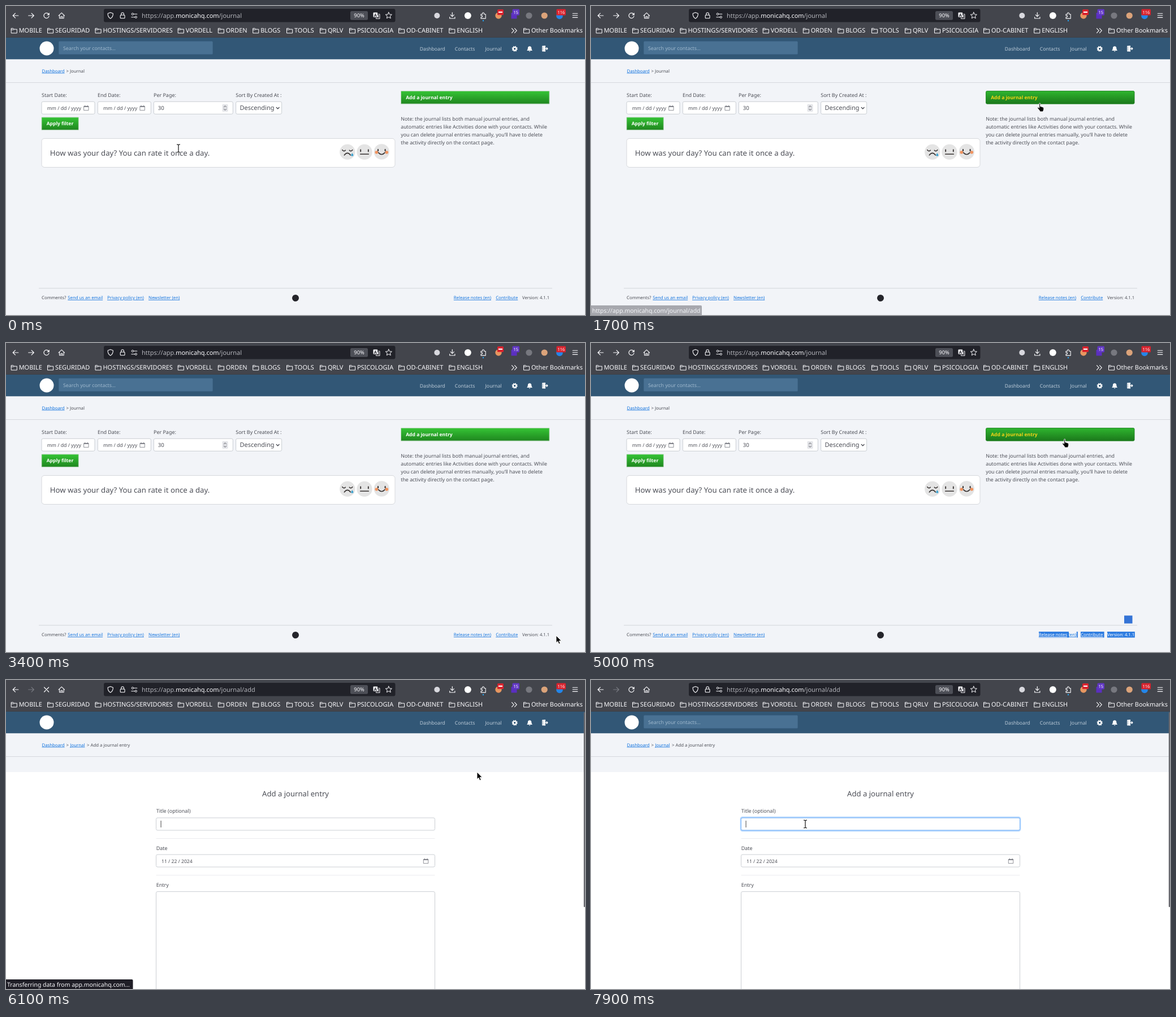
Write an HTML page that moves like this. It is 1024 by 547 pixels and loops after 8 s.

```html
<!DOCTYPE html>
<html lang="en">
<head>
<meta charset="utf-8">
<title>Journal</title>
<style>
  html, body { margin: 0; width: 100%; height: 100%; overflow: hidden; background: #f2f4f8; }
  svg { display: block; width: 100vw; height: 100vh; }
  text { font-family: 'Noto Sans', 'Open Sans', sans-serif; white-space: pre; text-rendering: geometricPrecision; }
</style>
</head>
<body>
<svg id="stage" viewBox="0 0 1024 547" preserveAspectRatio="none"></svg>
<script>
const NS = 'http://www.w3.org/2000/svg';
const stage = document.getElementById('stage');
let layer = stage;

function add(tag, attrs = {}, content) {
  const e = document.createElementNS(NS, tag);
  for (const k in attrs) e.setAttribute(k, attrs[k]);
  if (content) e.textContent = content;
  layer.appendChild(e);
  return e;
}
function group(draw, attrs, tag = 'g') {
  const outer = layer, g = add(tag, attrs);
  layer = g;
  draw();
  layer = outer;
  return g;
}
const rect = (x, y, width, height, fill, more) => add('rect', { x, y, width, height, fill, ...more });
const circle = (cx, cy, r, fill, more) => add('circle', { cx, cy, r, fill, ...more });
const path = (d, fill, more) => add('path', { d, fill, ...more });
const line = (d, stroke, width = 1.1, more) => path(d, 'none',
  { stroke, 'stroke-width': width, 'stroke-linecap': 'round', 'stroke-linejoin': 'round', ...more });
const text = (x, y, str, size, fill, more) => add('text', { x, y, 'font-size': size, fill, ...more }, str);
const link = (x, y, str, size) => text(x, y, str, size, '#1273de', { 'text-decoration': 'underline' });
const show = (g, on) => g.setAttribute('visibility', on ? 'visible' : 'hidden');
const field = (x, y, w, h) => rect(x, y, w, h, '#fff', { rx: 2.5, stroke: '#c6cad0', 'stroke-width': .9 });

function gradient(id, top, bottom) {
  group(() => {
    add('stop', { offset: 0, 'stop-color': top });
    add('stop', { offset: 1, 'stop-color': bottom });
  }, { id, x1: 0, y1: 0, x2: 0, y2: 1 }, 'linearGradient');
}
gradient('green', '#35c435', '#1f861f');
gradient('greenHover', '#2fb52f', '#1b781b');

const INK = '#4d4f57', PALE = '#f2f4f8', LIGHT = '#fbfbfe', BAR = '#43454c', WELL = '#212229';

function button(x, y, w, h, label, hover) {
  rect(x, y, w, h, `url(#${hover ? 'greenHover' : 'green'})`,
    { rx: hover ? 2 : .5, stroke: hover ? '#1d8220' : '#b9d9bb', 'stroke-width': .9 });
  text(x + 8.7, y + h / 2 + 3.2, label, 8.55, hover ? '#f5d417' : '#fff', { 'font-weight': 700 });
}
function calendar(x, y) {
  line(`M${x - 4} ${y - 3}h8v7.2h-8z`, '#74767e', .8);
  rect(x - 4, y - 3.4, 8, 1.7, '#74767e');
  line(`M${x - 2.3} ${y - 4.5}v1M${x + 2.3} ${y - 4.5}v1`, '#74767e', .8);
}

// ---- journal list ----
function face(x, y, draw) {
  circle(x, y, 13.7, '#e4e4e4');
  group(draw, { transform: `translate(${x} ${y})` });
}
const listPage = group(() => {
  rect(0, 94, 1024, 453, PALE);
  link(63.5, 117.6, 'Dashboard', 7.75);
  text(106.5, 117.6, '> Journal', 7.75, INK);
  rect(0, 135, 1024, 1, '#d5d8de');

  [[63, 'Start Date:'], [162, 'End Date:'], [261, 'Per Page:'], [406.3, 'Sort By Created At :']]
    .forEach(([x, s]) => text(x, 160.5, s, 8.95, INK));
  [63, 162.3].forEach(x => {
    field(x, 169.3, 94, 22);
    text(x + 9.7, 184, 'mm / dd / yyyy', 8.7, INK);
    calendar(x + 79, 180.5);
  });
  field(261.3, 169.3, 140, 22);
  text(268.8, 184, '30', 9.6, INK);
  rect(382.5, 174, 10, 13, '#e3e4e8', { rx: 1 });
  line('M385.3 179l2.2-2.2 2.2 2.2M385.3 182.2l2.2 2.2 2.2-2.2', '#55565e', 1);
  field(406.6, 169.3, 81, 22);
  text(413.5, 184.3, 'Descending', 11, INK);
  line('M478.3 179.5l2.4 2.5 2.4-2.5', '#44464e', 1.2);
  button(63, 197, 65.3, 22.4, 'Apply filter');

  rect(63, 234.5, 625, 51, '#fff', { rx: 5, stroke: '#d6d8dc', 'stroke-width': 1 });
  text(77.8, 264.7, 'How was your day? You can rate it once a day.', 13.17, INK);
  const dark = '#35302f';
  face(603.8, 258.4, () => {
    line('M-9-3.6q2.5 3.6 5.4.6M9-3.6q-2.5 3.6-5.4.6', dark, 1.5);
    line('M-5.5 5.5q5.5-7 11 0', dark, 1.6);
    path('M8.5 1.8q4.2 5.6 0 5.6t0-5.6', '#3fa3cf');
  });
  face(634, 258.4, () => {
    line('M-6.8-4v3.2M6.8-4v3.2', dark, 1.8);
    line('M-7.3 3.8h14.6', dark, 1.6);
  });
  face(664.3, 258, () => {
    circle(-9, 1, 2.8, '#f0935f');
    circle(9, 1, 2.8, '#f0935f');
    line('M-6.3-4v2.6M6.3-4v2.6', dark, 2);
    line('M-5.6 1.6q5.6 6.4 11.2 0', dark, 1.6);
  });

  ['Note: the journal lists both manual journal entries, and',
   'automatic entries like Activities done with your contacts. While',
   'you can delete journal entries manually, you’ll have to delete',
   'the activity directly on the contact page.']
    .forEach((s, i) => text(698.2, 203 + i * 14.15, s, 8.86, INK));

  rect(58, 499.2, 908, 1, '#d3d6db');
  text(63, 519.2, 'Comments?', 7.8, INK);
  link(109.3, 519.2, 'Send us an email', 7.75);
  link(179, 519.2, 'Privacy policy (en)', 7.75);
  link(252, 519.2, 'Newsletter (en)', 7.75);
  circle(512, 517, 6, '#24242a');
  link(791.8, 519.2, 'Release notes (en)', 7.75);
  link(866.2, 519.2, 'Contribute', 7.75);
  text(913, 519.2, 'Version: 4.1.1', 7.65, INK);
});

const addButton = [false, true].map(h => group(() => button(698.5, 150.6, 262.5, 22.6, 'Add a journal entry', h)));

let selEdge;
group(() => { selEdge = rect(792, 505, 190, 25, '#000'); }, { id: 'sel' }, 'clipPath');
const selection = group(() => {
  [[792, 53], [858.8, 2], [866, 41.6], [913, 48.8]].forEach(([x, w]) => rect(x, 511, w, 10.5, '#2f7de1'));
  text(791.8, 519.2, 'Release notes', 7.75, '#fff', { 'text-decoration': 'underline' });
  text(866.2, 519.2, 'Contribute', 7.75, '#fff', { 'text-decoration': 'underline' });
  text(913, 519.2, 'Version: 4.1.1', 7.65, '#fff');
}, { 'clip-path': 'url(#sel)' });
const popup = group(() => rect(943, 482.5, 14.5, 14, '#3473d6'));

// ---- entry form ----
let ring;
const formPage = group(() => {
  rect(0, 94, 1024, 69, PALE);
  rect(0, 163, 1024, 384, '#fff');
  link(63.5, 117.6, 'Dashboard', 7.75);
  text(106.5, 117.6, '>', 7.75, INK);
  link(113.5, 117.6, 'Journal', 7.75);
  text(143, 117.6, '> Add a journal entry', 7.75, INK);
  rect(0, 135, 1024, 1, '#d5d8de');
  text(512, 206.2, 'Add a journal entry', 13.1, INK, { 'text-anchor': 'middle' });
  text(265.7, 235.3, 'Title (optional)', 9, INK);
  field(265.5, 244, 493, 22);
  ring = group(() => {
    rect(264.8, 243, 494.4, 24, 'none', { rx: 3, stroke: '#b5d7ff', 'stroke-width': 2.4 });
    rect(265.5, 244, 493, 22, 'none', { rx: 2.5, stroke: '#7db8fb', 'stroke-width': 1 });
  });
  rect(273.6, 249, .9, 12, '#333');
  rect(265.5, 280, 493, 1, '#ececef');
  text(265.7, 301, 'Date', 9, INK);
  field(265.5, 309, 493, 22);
  text(275, 324, '11 / 22 / 2024', 8.6, INK, { 'font-variant-numeric': 'proportional-nums' });
  calendar(742.7, 320.5);
  rect(265.5, 345, 493, 1, '#ececef');
  text(265.7, 366, 'Entry', 9, INK);
  field(265.5, 374.6, 493, 190);
});

// ---- site header ----
rect(0, 56, 1024, 38.3, '#325776');
circle(72, 75, 12.5, '#fff');
const search = group(() => {
  rect(93.3, 62.6, 272.3, 22.8, '#497193', { rx: 1.5 });
  text(101, 77.5, 'Search your contacts…', 8.8, '#9fb9ce');
});
[[731.7, 'Dashboard'], [793.8, 'Contacts'], [847.5, 'Journal']]
  .forEach(([x, s]) => text(x, 79, s, 8.7, '#bccbd8'));
circle(899.7, 75.8, 2.8, 'none', { stroke: '#fff', 'stroke-width': 2.2 });
circle(899.7, 75.8, 4.3, 'none', { stroke: '#fff', 'stroke-width': 1.5, 'stroke-dasharray': '1.8 1.58' });
path('M921.2 79q1.7-1.4 1.7-4.2 0-3.4 3.2-3.6 3.2.2 3.2 3.6 0 2.8 1.7 4.2zM924.6 79.8h3q-1.5 2.2-3 0z', '#fff');
line('M952 71.2h-3.2v8.6h3.2', '#fff', 1.4);
path('M950 71l4-1v11l-4-1.2z', '#fff');
line('M954.5 75.5h3.2m-1.6-1.8l1.8 1.8-1.8 1.8', '#fff', 1.3);
const scrollbar = group(() => rect(1021.8, 57, 2.2, 345, '#66676c', { rx: 1 }));

// ---- browser toolbar ----
rect(0, 0, 1024, 55.4, BAR);
rect(0, 55.2, 1024, .8, '#24252b');
rect(173, 5, 515.5, 23.5, WELL, { rx: 3 });
line('M21.8 17h-9.4m4-4.2l-4.2 4.2 4.2 4.2', LIGHT, 1.2);
const forward = line('M39.7 17h9.4m-4-4.2l4.2 4.2-4.2 4.2', LIGHT, 1.2);
const reload = group(() => {
  line('M75.2 14.2a4.6 4.6 0 1 0 .8 4', LIGHT, 1.2);
  path('M76.8 11.8v4.4h-4.4z', LIGHT);
});
const stop = group(() => line('M67.6 13l8 8m0-8l-8 8', LIGHT, 1.2));
line('M93 17.2l5.3-5 5.3 5M94.5 16.5v5.2h7.6v-5.2M97 21.5v-3h2.6v3', LIGHT, 1.1);
line('M184.7 11.6l4.6 1.6q.3 6.2-4.6 9-4.9-2.8-4.6-9z', LIGHT, 1.1);
rect(202.2, 16, 7.8, 5.8, 'none', { rx: 1, stroke: LIGHT, 'stroke-width': 1.1 });
line('M203.8 16v-1.7a2.3 2.5 0 0 1 4.6 0v1.7', LIGHT);
line('M225.6 14.3h6.2M221.8 19.7h6.2', LIGHT);
[[223.8, 14.3], [229.8, 19.7]].forEach(p => circle(...p, 1.7, 'none', { stroke: LIGHT, 'stroke-width': 1 }));
let urlPath;
group(() => {
  add('tspan', {}, 'https://app.');
  add('tspan', { fill: LIGHT }, 'monicahq.com');
  urlPath = add('tspan');
}, { x: 240, y: 20.8, 'font-size': 10.95, fill: '#b3b4ba' }, 'text');
rect(609, 9, 31, 15.8, '#4d4f57', { rx: 2.5 });
text(624.5, 20.3, '90%', 9.3, LIGHT, { 'text-anchor': 'middle' });
rect(649.5, 11.5, 7.6, 8.2, LIGHT, { rx: 1 });
text(650.8, 18.5, 'A', 7.5, WELL, { 'font-weight': 700 });
line('M658.5 14.5h2.5v8h-6.5v-1.5M656.5 17.5h3.2m-1.6-1v1q-.3 2-1.8 3m.6-2.4q.8 1.6 2.6 2.4', LIGHT, .9);
{
  let d = '';
  for (let i = 0; i < 10; i++) {
    const r = i % 2 ? 2.7 : 5.9, a = Math.PI * (i / 5 - .5);
    d += (i ? 'L' : 'M') + (676.8 + r * Math.cos(a)) + ' ' + (17 + r * Math.sin(a));
  }
  line(d + 'z', LIGHT, 1);
}

// extensions
circle(762.3, 17, 5, '#d8d8de');
line('M789.3 11.5v7m-3-2.8l3 3 3-3M784.7 19.5v2.5h9.2v-2.5', LIGHT, 1.2);
circle(816.8, 17, 6, '#fff');
line('M840 14.5h2.5v-1.2a1.5 1.5 0 0 1 3 0v1.2h2.7v7.6h-8.2v-2.4h1.2a1.4 1.4 0 0 0 0-2.8h-1.2z', LIGHT, 1.1);
circle(844, 26, 1.2, '#2aa8f5');
circle(871, 17, 5.7, '#e79660');
rect(869, 6, 11, 10, '#d9232e', { rx: 1.5 });
rect(871, 9.8, 7, 2.2, '#fff');
rect(893.5, 12, 10, 10.5, '#5b2fc0');
rect(895.5, 5.5, 12.5, 11, '#6137c4', { rx: 1.5 });
text(901.8, 14, '15', 7.4, '#fff', { 'text-anchor': 'middle' });
circle(925, 17, 5.6, '#77787f');
circle(952.2, 17, 5.6, '#dba37a');
circle(979, 17.5, 5.8, '#2585e8');
rect(973.5, 5.5, 16.5, 11, '#d9232e', { rx: 1.5 });
text(981.8, 14, '116', 7.4, '#fff', { 'text-anchor': 'middle' });
line('M1002.2 13.2h8.6m-8.6 3.6h8.6m-8.6 3.6h8.6', LIGHT, 1.1);

// bookmarks
[[8.5, 'MOBILE'], [72.8, 'SEGURIDAD'], [157.3, 'HOSTINGS/SERVIDORES'], [303.5, 'VORDELL'], [374.6, 'ORDEN'],
 [436, 'BLOGS'], [495.8, 'TOOLS'], [554.8, 'QRLV'], [606.8, 'PSICOLOGIA'], [693.8, 'OD-CABINET'],
 [783, 'ENGLISH'], [914.8, 'Other Bookmarks']].forEach(([x, s]) => {
  line(`M${x + .7} 47.6v-8h3.6l1.5 1.6h5v6.4zM${x + .7} 42h4l1.2-.8`, LIGHT, 1);
  text(x + 14.2, 47.4, s, 10.95, LIGHT);
});
line('M894.5 39.6l3.8 4-3.8 4m5-8l3.8 4-3.8 4', LIGHT, 1.1);

// ---- status bubble ----
let bubble, bubbleText;
const status = group(() => {
  bubble = rect(-3, 530, 199, 20, '#1f1e26', { rx: 2 });
  bubbleText = text(2, 542.8, '', 10.45, LIGHT);
});

// ---- pointers, hot spot at 0,0 ----
const pointers = {
  arrow: group(() => path('M0 0v12.6l2.9-2.6 2 4.8 2.3-1-2-4.6h3.9z', '#000',
    { stroke: '#fff', 'stroke-width': .9, 'stroke-linejoin': 'round' })),
  hand: group(() => path('M-1.3 1q0-1 1-1t1 1v5l1-.3q1 0 1.2.8 1.6-.4 2 .7 1.8-.2 1.8 1.4v2.2q0 1.8-1 2.8v1.4h-6v-1.4l-3.6-4.4q-.9-1.3.2-1.9 1-.4 2.4 1.2z', '#000',
    { stroke: '#fff', 'stroke-width': .9, 'stroke-linejoin': 'round' })),
  beam: group(() => {
    const d = 'M-2.4-6.8q2.4-.2 2.4 1.4v10.8q0 1.6-2.4 1.4M2.4-6.8q-2.4-.2-2.4 1.4v10.8q0 1.6 2.4 1.4';
    line(d, '#fff', 2.4);
    line(d, '#111', 1.2);
  })
};

// time, x, y; the pointer glides between stops
const track = [
  [0, 305, 252], [600, 305, 252], [700, 275, 256], [900, 150, 257], [1000, 127, 246], [1100, 150, 236],
  [1300, 310, 210], [1500, 505, 178], [1600, 770, 167], [1700, 794, 172], [1900, 794, 172], [2000, 792, 170],
  [2300, 792, 170], [2400, 789, 167], [2700, 789, 167], [2800, 803, 420], [3000, 930, 500], [3200, 1013, 520],
  [3400, 973, 518], [3500, 973, 518], [3700, 966, 516], [4200, 795, 515], [4400, 795, 515], [4600, 806, 420],
  [4800, 830, 235], [4900, 839, 181], [5000, 838, 170], [5200, 833, 163], [6300, 833, 163], [6400, 795, 172],
  [6700, 580, 240], [6800, 480, 266], [6900, 405, 268], [7000, 382, 262], [7100, 382, 262],
  [7200, 381, 259], [7300, 379, 255], [8000, 379, 255]
];
function pointerAt(t) {
  const i = track.findIndex(p => p[0] > t);
  const [a, b] = [track[i - 1], track[i]];
  const k = (t - a[0]) / (b[0] - a[0]);
  return [a[1] + (b[1] - a[1]) * k, a[2] + (b[2] - a[2]) * k];
}
const during = (t, ...spans) => spans.some(([a, b]) => t >= a && t < b);

function render(time) {
  const t = Math.floor(time % 8000 / 100) * 100;   // screen refreshes ten times a second
  const form = t >= 6100;
  const hover = during(t, [1600, 2800], [4900, 6100]);
  show(listPage, !form);
  show(formPage, form);
  show(scrollbar, form);
  show(addButton[0], !form && !hover);
  show(addButton[1], hover);
  show(search, t !== 6100);
  forward.setAttribute('stroke', form ? '#797b82' : LIGHT);
  const loading = during(t, [5700, 6400]);
  show(reload, !loading);
  show(stop, loading);
  urlPath.textContent = form ? '/journal/add' : '/journal';

  const [x, y] = pointerAt(t);
  const kind = hover ? 'hand'
    : during(t, [0, 1000], [3800, 4500], [6900, 8000]) ? 'beam' : 'arrow';
  for (const k in pointers) show(pointers[k], k === kind);
  pointers[kind].setAttribute('transform', `translate(${x} ${y})`);

  show(selection, during(t, [3700, 5600]));
  selEdge.setAttribute('x', t < 4200 ? Math.max(792, x) : 792);
  show(popup, during(t, [4500, 5600]));

  let alpha = 0;
  if (during(t, [1800, 2900], [5500, 6200])) alpha = 1;
  else if (during(t, [1700, 1800], [2900, 3000], [5400, 5500])) alpha = .35;
  status.setAttribute('opacity', alpha);
  bubble.setAttribute('width', form ? 227.5 : 199);
  bubbleText.textContent = form ? 'Transferring data from app.monicahq.com…' : 'https://app.monicahq.com/journal/add';

  ring.setAttribute('opacity', t >= 7900 ? 1 : t >= 7800 ? .5 : 0);
}

const start = performance.now();
function tick() {
  render(performance.now() - start);
  requestAnimationFrame(tick);
}
tick();
</script>
</body>
</html>
```
